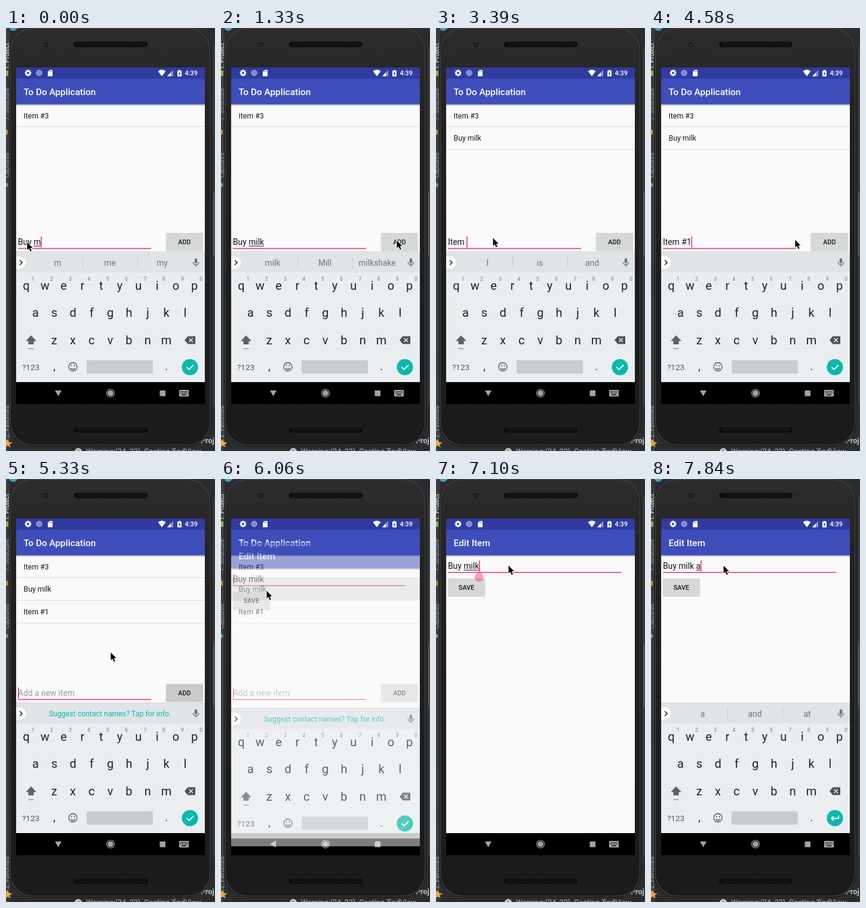
Write an HTML page with a canvas that moves like this. It is 350x706 px and loops after 7.99 s.

```html
<!DOCTYPE html>
<html lang="en">
<head>
<meta charset="utf-8">
<title>To Do Application</title>
<style>
html, body { margin: 0; width: 100%; height: 100%; overflow: hidden; background: #2b2b2b; }
canvas { display: block; width: 350px; height: 706px; }
</style>
</head>
<body>
<canvas id="stage"></canvas>
<script>
const LOOP = 7990, TICKS = 54, BLINK = 500 / (LOOP / TICKS);
const PINK = '#ee257e', TEAL = '#0bb8aa', INK = '#161616', KEY = '#14262d', GREY = '#6b767b';
const HINT = 'Suggest contact names? Tap for info.';
const scale = window.devicePixelRatio || 1;

function sized(canvas) {
  canvas.width = 350 * scale;
  canvas.height = 706 * scale;
  return canvas.getContext('2d');
}
const screen2d = sized(document.getElementById('stage'));
const buffer2d = sized(document.createElement('canvas'));
let c = screen2d;

// tick, typed text, start of the underlined word (-1: none), keyboard suggestions
const edits = [
  [0, 'Buy m', 4, ['m', 'me', 'my']],
  [1, 'Buy mi', 4, ['mi', 'mind', 'mine']],
  [2, 'Buy mil', 4, ['mil', 'milk', 'mill']],
  [3, 'Buy milk', 4, ['milk', 'Mill', 'milkshake']],
  [10, '', -1, HINT],
  [20, 'I', 0, ['I', "I'm", 'I’ll']],
  [21, 'It', 0, ['It', "It's", 'Its']],
  [22, 'Item', 0, ['Item', 'Items', 'Item’s']],
  [23, 'Item ', -1, ['I', 'is', 'and']],
  [26, 'Item #', -1, []],
  [28, 'Item #1', -1, []],
  [34, '', -1, HINT],
  [41, 'Buy milk', -1, HINT],
  [48, 'Buy milk', 4, ['milk', 'Mill', 'milkshake']],
  [52, 'Buy milk ', -1, ['and', 'is', 'for']],
  [53, 'Buy milk a', 9, ['a', 'and', 'at']]
];

// tick, x, y of the pointer tip
const pointerKeys = [
  [0, 35, 357], [4, 35, 357], [8, 294, 354], [12, 294, 354], [15, 178, 338], [17, 95, 350],
  [29, 95, 350], [32, 292, 354], [34, 292, 354], [36, 175, 289], [39, 76, 186],
  [42, 76, 186], [46, 121, 144], [54, 121, 144]
];

function rect(x, y, w, h, color, r = 0) {
  c.fillStyle = color;
  c.beginPath();
  c.roundRect(x, y, w, h, r);
  c.fill();
}
function disc(x, y, r, color) {
  c.fillStyle = color;
  c.beginPath();
  c.arc(x, y, r, 0, 7);
  c.fill();
}
function ring(x, y, r, color, width) {
  c.strokeStyle = color;
  c.lineWidth = width;
  c.beginPath();
  c.arc(x, y, r, 0, 7);
  c.stroke();
}
function shape(path, color) {
  c.fillStyle = color;
  c.fill(new Path2D(path));
}
function line(path, color, width) {
  c.strokeStyle = color;
  c.lineWidth = width;
  c.stroke(new Path2D(path));
}
function text(str, x, y, size, color, weight = 400, align = 'left') {
  c.font = `${weight} ${size}px Roboto, sans-serif`;
  c.textAlign = align;
  c.fillStyle = color;
  c.fillText(str, x, y);
}
function sideText(str, bottom, color) {
  c.save();
  c.translate(4.5, bottom);
  c.rotate(-Math.PI / 2);
  text(str, 0, 0, 10.5, color);
  c.restore();
}

function mesh(x, y, w, h) {
  rect(x, y, w, h, '#090909', h / 2);
  for (let row = 0; row < h / 2 - 1; row++)
    for (let i = 2; i < w / 2 - 2; i++)
      rect(x + i * 2 + row % 2, y + 1 + row * 2, 1, 1, '#303030');
}

function drawPhone() {
  rect(0, 0, 350, 706, '#2b2c2d');
  rect(0, 0, 6, 706, '#3a3c3e');
  rect(347, 30, 3, 600, '#393b3d');
  rect(347, 275, 2, 106, '#5b5d5e');
  shape('M6 0H20L14 5L8 4Z', '#3f9fbd');
  sideText('1: Project', 69, '#f0f0f0');
  sideText('7: Structure', 154, '#9a9c9e');
  sideText('Captures', 250, '#9a9c9e');
  sideText('2: Favorites', 684, '#a5a7a9');
  rect(0, 71, 4, 9, '#79b65b');
  rect(0, 170, 3, 8, '#c28a3d');
  disc(0, 262, 3.5, '#4e9fc9');
  shape('M3 686L5 691L11 692L6 695L8 700L3 697L-2 700V691Z', '#efa33a');
  text('Proj', 326, 692.5, 12.5, '#bfc1c2', 700);
  disc(121, 707, 6, '#c8c8c8');
  text('!', 121, 711, 9, '#333', 700, 'center');
  text("Warning:(24, 23)  Casting 'findView", 134, 710.5, 12.5, '#b9babb');

  const body = c.createLinearGradient(0, 0, 0, 696);
  body.addColorStop(0, '#2c2c2c');
  body.addColorStop(.25, '#212121');
  body.addColorStop(1, '#1b1b1b');
  rect(5.5, 0, 338, 698, '#0d0d0d', 38);
  rect(6.5, 0, 336, 697, '#414141', 37);
  rect(8, 1.5, 333, 694, body, 36);
  disc(67, 28, 4, '#161616');
  disc(67, 28, 2, '#303238');
  mesh(114, 23, 123, 9);
  mesh(114, 667, 123, 8);
}

function drawStatus() {
  rect(17, 66, 316, 18.5, '#303b9f');
  for (let i = 0; i < 8; i++) {
    c.save();
    c.translate(37, 75);
    c.rotate(i * Math.PI / 4);
    rect(-1.2, -5.5, 2.4, 3, '#fff');
    c.restore();
  }
  ring(37, 75, 3, '#fff', 2.2);
  disc(55.5, 75, 5, '#7f88ca');
  ring(55.5, 75, 4.6, '#a7aedd', 1);
  shape('M73 70H78V80.5H70V73Z', '#fff');
  for (const x of [72.5, 74.3, 76.1]) rect(x, 71.5, .8, 2, '#303b9f');
  shape('M254.5 72Q261 67 267.5 72L261 80.5Z', '#fff');
  shape('M270 80.5L280 70V80.5Z', '#8d94cc');
  shape('M270 80.5L276 74.2V80.5Z', '#fff');
  shape('M287 71.2H289V70H292V71.2H294V80.7H287Z', '#fff');
  shape('M291.2 72.5L288.7 76.7H290.3V79.5L292.5 75.4H291Z', '#303b9f');
  text('4:39', 299.5, 79, 10.8, '#fff', 500);
}

function drawToolbar(title) {
  rect(17, 84, 316, 43.5, '#3f4dba');
  const shadow = c.createLinearGradient(0, 127.5, 0, 130.5);
  shadow.addColorStop(0, 'rgba(0,0,0,.3)');
  shadow.addColorStop(1, 'rgba(0,0,0,0)');
  rect(17, 127.5, 316, 3, shadow);
  text(title, 29.5, 112, 15.4, '#fff', 500);
}

function drawButton(label, x, y, pressed) {
  rect(x - .3, y + .5, 62.6, 29.8, 'rgba(0,0,0,.18)', 2);
  rect(x, y, 62, 29, pressed ? '#c9caca' : '#d6d7d7', 1.5);
  text(label, x + 31, y + 18.7, 10.8, INK, 500, 'center');
}

function drawField(edit, baseline, width, caretOn, caretIndex) {
  const [, value, underline] = edit;
  const measure = n => c.measureText(value.slice(0, n)).width;
  rect(20, baseline + 5.3, width, 1.5, PINK);
  text(value || 'Add a new item', 20, baseline, 13.84, value ? INK : '#9a9a9a');
  if (underline >= 0)
    rect(20 + measure(underline), baseline + 1.6, measure(value.length) - measure(underline), 1, INK);
  const caretX = 20 + measure(caretIndex);
  if (caretOn) rect(caretX, baseline - 14, 1.5, 18.5, PINK);
  return caretX;
}

function drawList(tick, edit, caretOn) {
  rect(17, 84, 316, 507, '#fafafa');
  if (tick >= 38) rect(17, 165, 316, 37, '#dedede');
  const items = ['Item #3'];
  if (tick >= 10) items.push('Buy milk');
  if (tick >= 34) items.push('Item #1');
  items.forEach((item, i) => {
    text(item, 29.5, 150.5 + i * 37.9, 12.3, INK);
    rect(17, 164 + i * 38, 316, 1, '#dadada');
  });
  drawToolbar('To Do Application');
  const listField = tick < 41 ? edit : edits[11];
  drawField(listField, 362, 223, caretOn, listField[1].length);
  drawButton('ADD', 268, 342, tick >= 10 && tick < 13 || tick >= 34 && tick < 37);
}

function drawEditor(tick, edit, caretOn) {
  rect(17, 84, 316, 507, '#fafafa');
  drawToolbar('Edit Item');
  const caretX = drawField(edit, 150, 290, caretOn, tick < 48 ? 0 : edit[1].length);
  drawButton('SAVE', 20, 166, false);
  if (tick >= 48 && tick < 52) {
    c.save();
    c.translate(caretX, 164);
    c.fillStyle = 'rgba(255,64,129,.5)';
    c.beginPath();
    c.moveTo(0, -9.5);
    c.arc(0, 0, 7.5, -Math.PI / 4, Math.PI * 1.25);
    c.closePath();
    c.fill();
    c.restore();
  }
}

function drawNav(keyboardOpen) {
  const grey = '#a3a3a3';
  rect(17, 591, 316, 37, '#000');
  shape(keyboardOpen ? 'M82 605H93L87.5 614.5Z' : 'M92 603.5V615L82 609.2Z', grey);
  ring(175, 609.5, 6.5, grey, 1.2);
  disc(175, 609.5, 4.8, grey);
  rect(257.5, 605, 9.5, 9.5, grey);
  if (!keyboardOpen) return;
  rect(290, 604, 16, 11, grey, 1);
  for (let i = 0; i < 10; i++)
    rect(292 + i % 5 * 2.6, i < 5 ? 606 : 608.7, 1.4, 1.4, '#000');
  rect(294, 611.6, 8, 1.4, '#000');
}

function drawKeyboard(suggestions, enterKey) {
  rect(17, 373, 316, 218, '#eaeef1');
  rect(17, 373, 316, 35, '#dfe4e7');
  rect(17, 373, 316, 1, '#d3d8db');
  shape('M17 381H23A10.5 10.5 0 0 1 23 402H17Z', '#fff');
  line('M23 387.5L27 391.5L23 395.5', '#222', 1.6);
  if (suggestions === HINT) {
    text(HINT, 174, 396, 12.3, TEAL, 400, 'center');
  } else if (suggestions.length) {
    suggestions.forEach((word, i) => text(word, 86.5 + i * 87.5, 396.5, 13.84, GREY, 400, 'center'));
    rect(128, 382, 1, 18, '#c3c9cc');
    rect(220, 382, 1, 18, '#c3c9cc');
  }
  rect(315.7, 384.5, 4.6, 8.5, GREY, 2.3);
  line('M313.2 390.5A4.8 4.8 0 0 0 322.8 390.5M318 395V398.5', GREY, 1.4);

  const rows = [['qwertyuiop', 34, 437], ['asdfghjkl', 49.5, 482], ['zxcvbnm', 80.7, 527.5]];
  for (const [letters, x, y] of rows)
    [...letters].forEach((letter, i) => text(letter, x + i * 31.3, y, 20, KEY, 400, 'center'));
  for (let i = 0; i < 10; i++)
    text((i + 1) % 10, 45 + i * 31.3, 422, 8.3, GREY, 400, 'center');

  shape('M42 513L51 522.5H46.5V528H37.5V522.5H33Z', '#57656b');
  rect(37.5, 534.5, 9, 1.5, '#8d979b');
  shape('M299 521L304.5 514.5H317V527.5H304.5Z', '#46545a');
  line('M306.5 517.7L313 524.3M313 517.7L306.5 524.3', '#eaeef1', 1.5);
  text('?123', 41.5, 570.5, 13.5, '#4c5a60', 400, 'center');
  text(',', 81, 571, 18, KEY, 400, 'center');
  text('.', 268.5, 571, 18, KEY, 400, 'center');
  ring(112, 565.5, 7, '#46545a', 1.3);
  disc(109.5, 563.5, 1.1, '#46545a');
  disc(114.5, 563.5, 1.1, '#46545a');
  line('M108.5 567.5Q112 572 115.5 567.5', '#46545a', 1.3);
  rect(135, 554.5, 111, 22.5, '#c7ccd0', 2);
  disc(308, 566, 13.6, TEAL);
  line(enterKey ? 'M314 562V566.5H302.5M306 562.8L302.3 566.5L306 570.2'
                : 'M302.5 566L306.5 570L314 562.5', '#fff', 1.8);
}

function drawPointer(tick) {
  const next = pointerKeys.findIndex(key => key[0] > tick);
  const [t0, x0, y0] = pointerKeys[next - 1], [t1, x1, y1] = pointerKeys[next];
  const p = (tick - t0) / (t1 - t0), eased = p * p * (3 - 2 * p);
  c.save();
  c.translate(x0 + (x1 - x0) * eased, y0 + (y1 - y0) * eased);
  const arrow = 'M.5 .5V13.5L3.4 10.8L5.7 16L7.8 15.1L5.6 10H9.7Z';
  c.lineJoin = 'round';
  line(arrow, '#fff', 2.2);
  shape(arrow, '#000');
  c.restore();
}

// Draws into the buffer first, so that the whole layer fades as one picture.
function layer(offset, alpha, paint) {
  c = buffer2d;
  c.setTransform(scale, 0, 0, scale, 0, 0);
  c.clearRect(0, 0, 350, 706);
  paint();
  c = screen2d;
  c.globalAlpha = alpha;
  c.drawImage(buffer2d.canvas, 0, offset, 350, 706);
  c.globalAlpha = 1;
}

// offset and opacity of the keyboard, or nothing while it is hidden
function keyboardPose(tick) {
  if (tick === 41) return [9, .7];
  if (tick === 42) return [38.5, .11];
  if (tick > 42 && tick < 49) return null;
  if (tick === 49) return [24, .65];
  return [0, 1];
}

function draw(time) {
  const tick = Math.min(TICKS - 1, Math.floor((time % LOOP + 25) / (LOOP / TICKS)));
  const edit = edits.findLast(e => e[0] <= tick);
  const caretOn = (tick - edit[0]) % (2 * BLINK) < BLINK;
  const pose = keyboardPose(tick);

  c.setTransform(scale, 0, 0, scale, 0, 0);
  drawPhone();
  c.save();
  c.beginPath();
  c.rect(17, 66, 316, 562);
  c.clip();
  drawNav(tick < 41 || tick >= 48);
  if (tick < 42) drawList(tick, edit, caretOn);
  if (tick >= 41) {
    const offset = tick === 41 ? 22 : tick === 42 ? 3.5 : 0;
    if (tick === 42) rect(17, 84, 316, 4, '#303b9f');
    layer(offset, tick === 41 ? .5 : 1, () => drawEditor(tick, edit, caretOn));
  }
  drawStatus();
  if (pose) layer(...pose, () => drawKeyboard(edit[3], tick >= 48));
  c.restore();
  drawPointer(tick);
}

function frame(now) {
  draw(now);
  requestAnimationFrame(frame);
}
draw(0);
requestAnimationFrame(frame);
</script>
</body>
</html>
```
